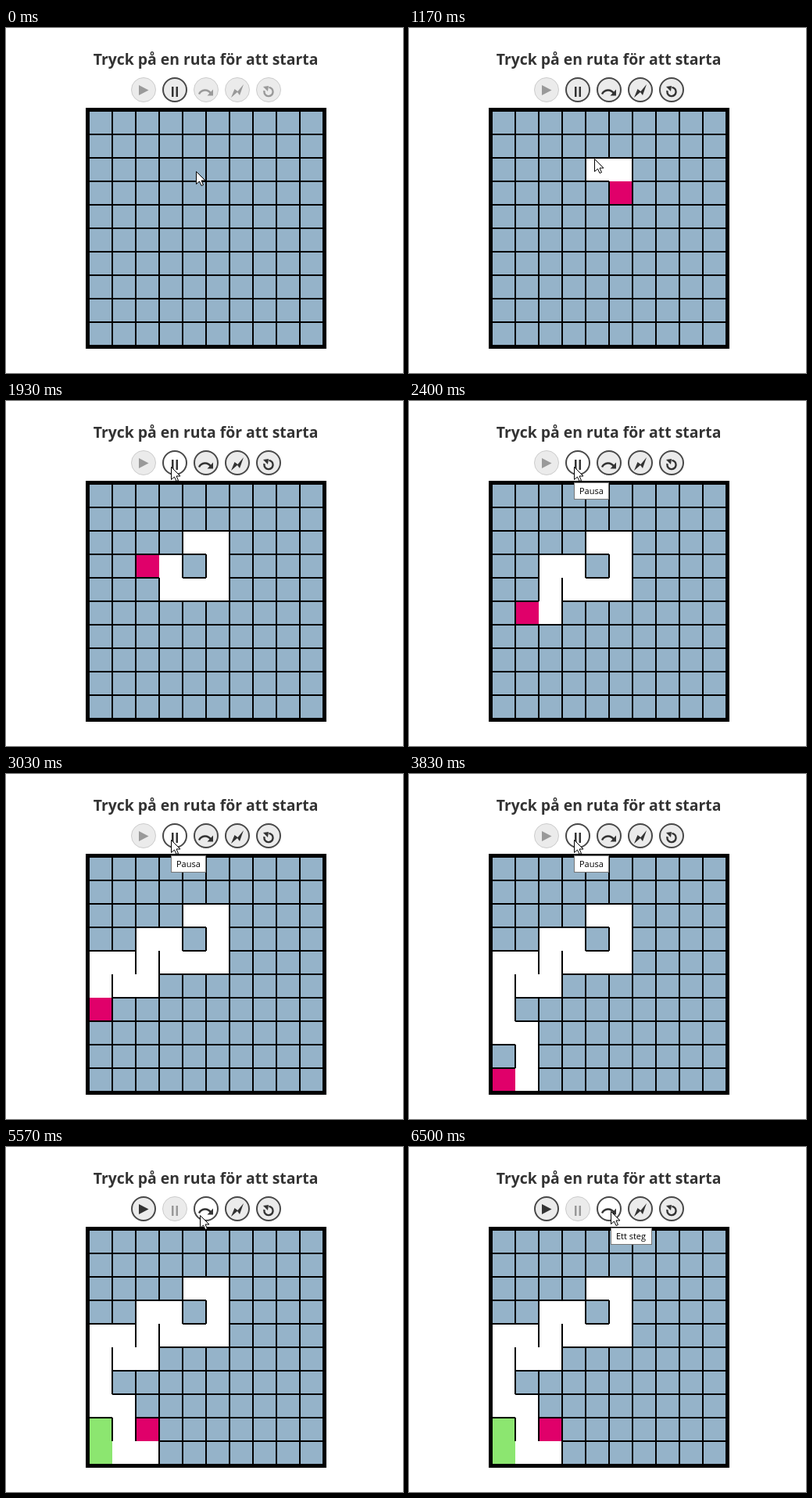
An HTML page with a canvas that plays this animation: 508 by 441 pixels, repeating every 8 s.

```html
<!DOCTYPE html>
<html lang="sv">
<head>
<meta charset="utf-8">
<style>
html, body { margin: 0; width: 100%; height: 100%; overflow: hidden; background: #fff; }
canvas { display: block; }
</style>
</head>
<body>
<canvas id="stage" width="508" height="441"></canvas>
<script>
const ctx = document.getElementById('stage').getContext('2d');
const LOOP = 8000, SIZE = 10, CELL = 30, ORIGIN = 106;
const BLUE = '#95b3c9', PINK = '#e0006a', GREEN = '#8ce670', DARK = '#333';
const START = 830, PRESS = 4630, PAUSED = 4770;

// The picture advances 30 times a second, the maze once every 4.75 ticks.
const TICKS_PER_MS = 0.03, FIRST_TICK = 25, TICKS_PER_MOVE = 4.75;
const tickAt = t => Math.floor((t + 5) * TICKS_PER_MS);

// Lower case letters are backtracking moves.
const MOVES = 'RDDLLULDDLULDDDRDDLUdrRU';
const DIRS = { U: [0, -1], R: [1, 0], D: [0, 1], L: [-1, 0] };
const OPPOSITE = { U: 'D', D: 'U', L: 'R', R: 'L' };

// Pointer glides: where each one ends and when it runs.
const GLIDES = [
  { x: 237, y: 167, from: 800, to: 1166 },
  { x: 211, y: 84, from: 1266, to: 1600 },
  { x: 247, y: 87, from: 5166, to: 5333 },
  { x: 258, y: 82, from: 5533, to: 6000 }
];

function pointerAt(t) {
  let x = 243, y = 183;
  for (const g of GLIDES) {
    const p = Math.min(1, Math.max(0, (t - g.from) / (g.to - g.from)));
    x += (g.x - x) * p;
    y += (g.y - y) * p;
  }
  return [Math.round(x), Math.round(y)];
}

function rect(color, x, y, w, h) {
  ctx.fillStyle = color;
  ctx.fillRect(x, y, w, h);
}

function shape(...points) {
  ctx.beginPath();
  points.forEach(([x, y]) => ctx.lineTo(x, y));
  ctx.closePath();
  ctx.fill();
}

function text(str, x, y, font, color, align) {
  ctx.font = font + ' "Open Sans", "Noto Sans", sans-serif';
  ctx.textAlign = align;
  ctx.fillStyle = color;
  ctx.fillText(str, x, y);
}

function mazeAt(tick) {
  const cells = Array.from({ length: SIZE * SIZE }, () => ({ color: BLUE, open: '' }));
  if (tick < FIRST_TICK) return cells;
  let x = 4, y = 2;
  const here = () => cells[y * SIZE + x];
  const count = Math.ceil((tick - FIRST_TICK + 1) / TICKS_PER_MOVE) - 1;
  for (const move of MOVES.slice(0, count)) {
    const dir = move.toUpperCase();
    here().color = dir === move ? '#fff' : GREEN;
    here().open += dir;
    x += DIRS[dir][0];
    y += DIRS[dir][1];
    here().open += OPPOSITE[dir];
  }
  here().color = PINK;
  return cells;
}

function drawMaze(tick) {
  rect('#000', 102, 102, 308, 308);
  mazeAt(tick).forEach(({ color, open }, i) => {
    const x = ORIGIN + i % SIZE * CELL, y = ORIGIN + Math.floor(i / SIZE) * CELL;
    const end = CELL - 1;
    rect(color, x, y, CELL, CELL);
    if (!open.includes('U')) rect('#000', x, y, CELL, 1);
    if (!open.includes('D')) rect('#000', x, y + end, CELL, 1);
    if (!open.includes('L')) rect('#000', x, y, 1, CELL);
    if (!open.includes('R')) rect('#000', x + end, y, 1, CELL);
  });
}

// Icons are drawn around the button centre.
const ICONS = [
  function play() {
    shape([-6, -6], [6.5, 0.5], [-6, 7]);
  },
  function pause() {
    ctx.fillRect(-4, -4, 2.5, 13);
    ctx.fillRect(1.5, -4, 2.5, 13);
  },
  function step() {
    ctx.beginPath();
    ctx.moveTo(-9, 5.5);
    ctx.bezierCurveTo(-6, -0.5, 2, -1.5, 6, 4.5);
    ctx.stroke();
    shape([9, -0.5], [9, 7.5], [1.5, 7.5]);
  },
  function bolt() {
    shape([8, -7], [3, 7], [0, 3], [-8, 10], [-3.5, -1], [0.5, 2]);
  },
  function reset() {
    ctx.beginPath();
    ctx.arc(0, 2.5, 5.6, -1.5, 3.4);
    ctx.stroke();
    shape([-7, -4], [0, -5], [-1, 2]);
  }
];

function drawButtons(t, [px, py]) {
  const paused = t >= PAUSED, started = t >= START;
  const enabled = [paused, !paused, started, started, started];
  ICONS.forEach((icon, i) => {
    const x = 176 + i * 40, y = 79, on = enabled[i];
    const pressed = i === 1 && t >= PRESS;
    const hover = on && !pressed && Math.hypot(px - x, py - y) < 16;
    ctx.save();
    ctx.translate(x, y);
    ctx.beginPath();
    ctx.arc(0, 0, on ? 15 : 15.5, 0, 7);
    ctx.fillStyle = hover ? '#fff' : '#ebebeb';
    ctx.fill();
    ctx.strokeStyle = on ? '#484848' : '#ccc';
    ctx.lineWidth = on ? 2 : 1;
    ctx.stroke();
    ctx.fillStyle = ctx.strokeStyle = on ? DARK : '#999';
    ctx.lineWidth = 2.4;
    icon();
    ctx.restore();
  });
}

function drawTip(str, x, y, w) {
  rect('#767676', x, y, w, 22);
  rect('#fff', x + 1, y + 1, w - 2, 20);
  text(str, x + 7, y + 15, '11px', '#000', 'left');
}

function drawPointer([x, y]) {
  ctx.save();
  ctx.translate(x + 0.5, y + 0.5);
  ctx.fillStyle = '#fff';
  shape([0, 0], [0, 16], [4, 12.5], [6.5, 18], [9, 17], [6.5, 11.5], [11.5, 11.5]);
  ctx.strokeStyle = '#000';
  ctx.lineWidth = 1;
  ctx.stroke();
  ctx.restore();
}

function frame(now) {
  const t = now % LOOP, tick = tickAt(t);
  const pointer = pointerAt(tick / TICKS_PER_MS);
  rect('#fff', 0, 0, 508, 441);
  text('Tryck på en ruta för att starta', 255.5, 47, 'bold 19.4px', DARK, 'center');
  drawMaze(tick);
  drawButtons(t, pointer);
  if (t >= 2130 && t < PRESS) drawTip('Pausa', 211, 104, 45);
  if (t >= 6500) drawTip('Ett steg', 258, 103, 53);
  drawPointer(pointer);
  requestAnimationFrame(frame);
}
requestAnimationFrame(frame);
</script>
</body>
</html>
```
